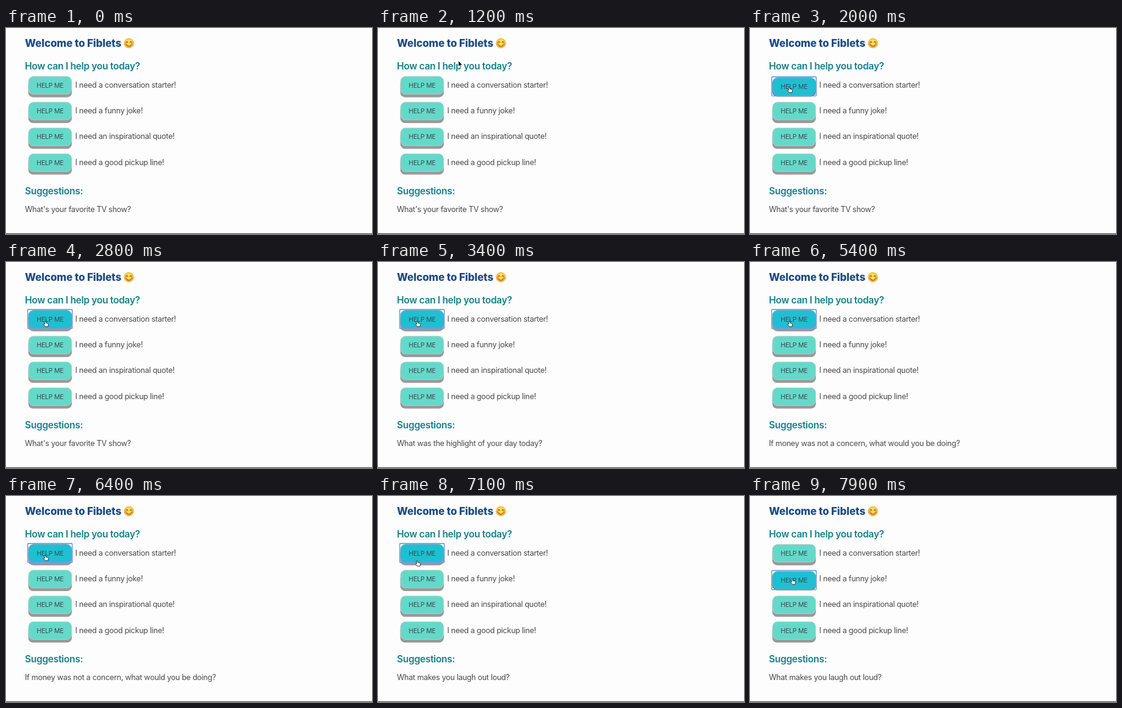
These frames come from a looping animation (600x338 px, 8 s). An HTML page with a canvas:

```html
<!DOCTYPE html>
<html lang="en">
<head>
<meta charset="utf-8">
<title>Welcome to Fiblets</title>
<style>
  html, body { margin: 0; width: 100%; height: 100%; overflow: hidden; background: #fdfdfd; }
  canvas { display: block; width: 600px; height: 338px; }
</style>
</head>
<body>
<canvas id="stage"></canvas>
<script>
const W = 600, H = 338, LOOP = 8000;
const canvas = document.getElementById('stage');
const ctx = canvas.getContext('2d');
const dpr = window.devicePixelRatio || 1;
canvas.width = W * dpr;
canvas.height = H * dpr;

const FONT = 'Inter, "Open Sans", sans-serif';
const ROWS = [
  'I need a conversation starter!',
  'I need a funny joke!',
  'I need an inspirational quote!',
  'I need a good pickup line!'
];
const TIPS = [
  [0, "What's your favorite TV show?"],
  [3000, 'What was the highlight of your day today?'],
  [5100, 'If money was not a concern, what would you be doing?'],
  [6800, 'What makes you laugh out loud?']
];
// start, end, button
const PRESSES = [[1900, 2150, 0], [4050, 4250, 0], [5850, 6050, 0], [7750, 8000, 1]];
// time, x, y of the fingertip
const PATH = [
  [400, 362, 10], [900, 196, 14], [1500, 68, 93], [1800, 64, 97],
  [6800, 64, 97], [7100, 64, 106], [7600, 69, 136], [8000, 69, 136]
];

const rowTop = i => 79.5 + i * 42.3;

function text(str, x, y, size, weight, color, spacing = 0) {
  ctx.font = `${weight} ${size}px ${FONT}`;
  ctx.letterSpacing = spacing + 'px';
  ctx.fillStyle = color;
  ctx.fillText(str, x, y);
}

const heading = (str, y) => text(str, 31, y, 15.6, 600, '#16808a', -0.34);
const body = (str, x, y) => text(str, x, y, 12.6, 400, '#4a4a4a', -0.29);

function box(x, y, w, h, r, fill, stroke, line = 1) {
  ctx.beginPath();
  ctx.roundRect(x, y, w, h, r);
  if (fill) { ctx.fillStyle = fill; ctx.fill(); }
  if (stroke) { ctx.strokeStyle = stroke; ctx.lineWidth = line; ctx.stroke(); }
}

function pointer(t) {
  if (t < PATH[0][0]) return null;
  const i = PATH.findIndex((p, k) => k && t <= p[0]);
  const [t0, x0, y0] = PATH[i - 1], [t1, x1, y1] = PATH[i];
  const u = (t - t0) / (t1 - t0), e = u * u * (3 - 2 * u);
  return { x: x0 + (x1 - x0) * e, y: y0 + (y1 - y0) * e };
}

function button(i, hover, pressed, focused) {
  const y = rowTop(i), dy = pressed ? 2.2 : 0;
  box(36.5, y + (pressed ? 3.4 : 4.7), 71.5, 29.5, 8, pressed ? '#5d7186' : '#999');
  box(37, y + dy, 70.5, 29, 8, hover ? '#1fbfd2' : '#64d9c9', hover ? '#5aaebb' : '#b3cfca');
  if (focused) box(35.6, y - 1.6 + dy, 73, 31.4, 1, null, '#709be8', 1.6);
  text('HELP ME', 50.3, y + 18.2 + dy, 10.6, 400, '#3a4c50', -0.26);
}

function emoji(x, y) {
  const g = ctx.createRadialGradient(x, y - 2, 1, x, y, 8.2);
  g.addColorStop(0, '#ffe566');
  g.addColorStop(0.7, '#fbcf45');
  g.addColorStop(1, '#eda62c');
  const disc = (cx, cy, r, fill) => {
    ctx.beginPath();
    ctx.arc(cx, cy, r, 0, 7);
    ctx.fillStyle = fill;
    ctx.fill();
  };
  disc(x, y, 8.2, g);
  disc(x - 5, y + 1.5, 2, 'rgba(242,120,70,.65)');
  disc(x + 5, y + 1.5, 2, 'rgba(242,120,70,.65)');
  ctx.strokeStyle = '#75451c';
  ctx.lineWidth = 1.1;
  ctx.lineCap = 'round';
  const arc = (cx, cy, r, a, b) => {
    ctx.beginPath();
    ctx.arc(cx, cy, r, a, b);
    ctx.stroke();
  };
  arc(x - 3.2, y - 0.8, 1.6, Math.PI * 1.1, Math.PI * 1.9);
  arc(x + 3.2, y - 0.8, 1.6, Math.PI * 1.1, Math.PI * 1.9);
  arc(x, y + 0.8, 4.2, Math.PI * 0.15, Math.PI * 0.85);
}

function cursor(p, hand) {
  const shape = new Path2D(hand
    ? 'M-1 0.6Q0-.8 1 .6L1.3 3.2Q2.4 2.4 3 3.6Q4.2 3 4.6 4.2Q6 4 5.8 5.4L5 9H.4L-2.8 5.4Q-2.6 4-.8 5Z'
    : 'M0 0V10L2.3 7.9L3.9 11.4L5.4 10.7L3.9 7.3H7Z');
  ctx.save();
  ctx.translate(p.x, p.y);
  ctx.lineJoin = 'round';
  ctx.lineWidth = 1;
  ctx.fillStyle = hand ? '#fff' : '#111';
  ctx.strokeStyle = hand ? '#25333a' : '#fff';
  ctx.fill(shape);
  ctx.stroke(shape);
  ctx.restore();
}

function draw(t) {
  ctx.setTransform(dpr, 0, 0, dpr, 0, 0);
  ctx.fillStyle = '#fdfdfd';
  ctx.fillRect(0, 0, W, H);
  ctx.fillStyle = '#555';
  ctx.fillRect(0, 336.8, W, 1.2);

  text('Welcome to Fiblets', 31, 31.4, 17, 800, '#1d4b85', -0.1);
  emoji(201.5, 25);
  heading('How can I help you today?', 68.3);
  heading('Suggestions:', 272.5);

  const p = pointer(t);
  const over = p ? ROWS.findIndex((_, i) =>
    p.x > 37 && p.x < 108 && p.y > rowTop(i) && p.y < rowTop(i) + 33) : -1;
  const last = PRESSES.filter(q => t >= q[0]).pop();
  ROWS.forEach((label, i) => {
    const focused = !!last && last[2] === i;
    button(i, over === i, focused && t < last[1], focused);
    body(label, 113.5, rowTop(i) + 18.3);
  });

  body(TIPS.filter(q => t >= q[0]).pop()[1], 31, 301.8);
  if (p) cursor(p, over >= 0);
}

const start = performance.now();
function tick(now) {
  draw(Math.max(0, now - start) % LOOP);
  requestAnimationFrame(tick);
}
draw(0);
requestAnimationFrame(tick);
</script>
</body>
</html>
```
